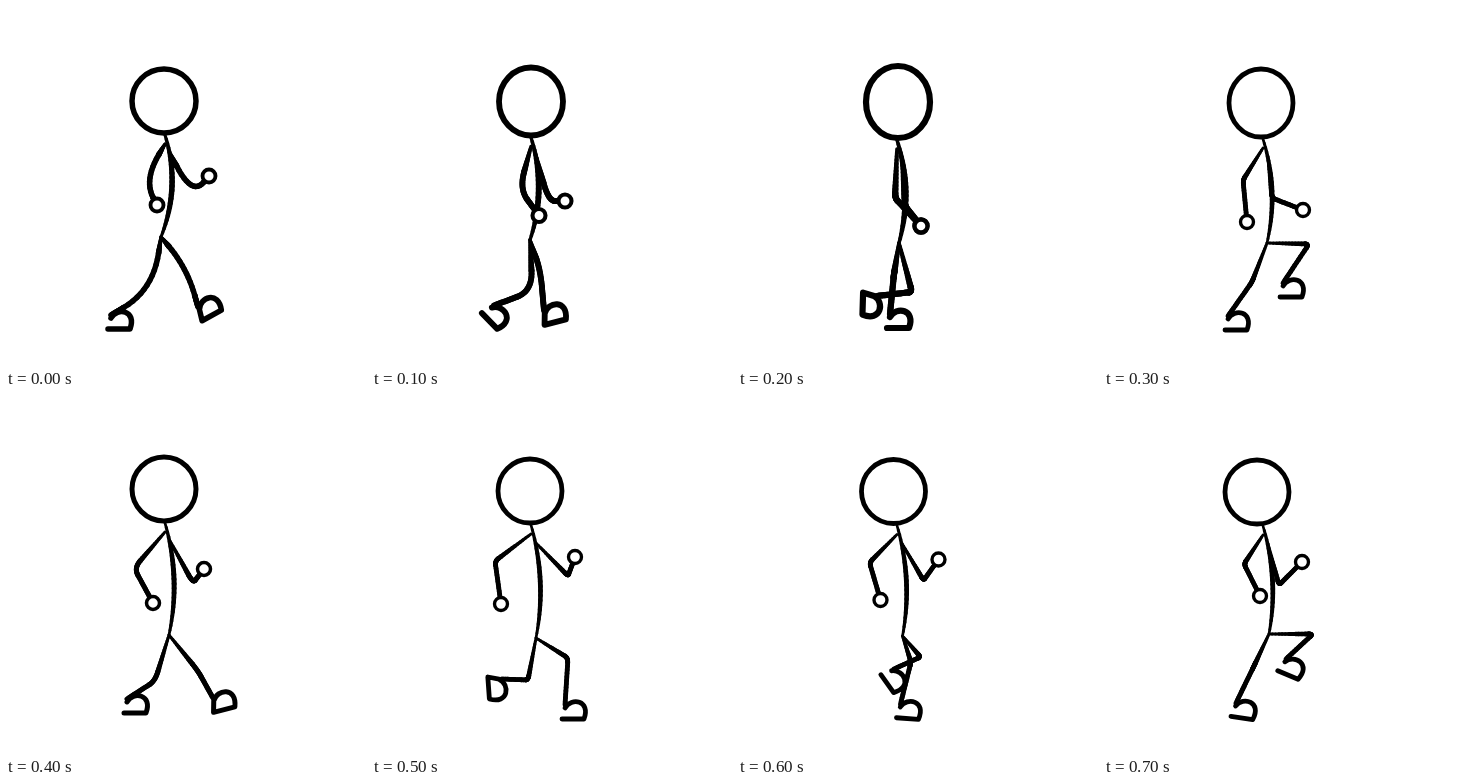
These frames come from a looping animation (360 by 360 pixels, 0.8 s). An HTML page with a canvas:

```html
<!DOCTYPE html>
<html lang="en">
<head>
<meta charset="utf-8">
<title>Walk cycle</title>
<style>
html, body { margin: 0; width: 100%; height: 100%; overflow: hidden; background: #fff; }
canvas { display: block; width: 360px; height: 360px; }
</style>
</head>
<body>
<canvas id="stage" width="360" height="360"></canvas>
<script>
const ctx = document.getElementById('stage').getContext('2d');
const STEP = 100;
const NECK_X = 159;

// Head: x, y, half height. Arms: elbow, hand. Legs: knee, ankle, foot tilt.
// Soft rounds the joints, ink is the pen width.
const contact = {
  ink: 5.5, soft: 0.7, head: [158, 95, 32], hip: [155, 231],
  rear: [[138, 174], [151, 199]], fore: [[186, 190], [203, 170]],
  legA: [[147, 284], [105, 309], 0], legB: [[181, 262], [192, 301], -0.5]
};
const passing = {
  ink: 6.2, soft: 0.1, head: [160, 96, 36], hip: [161, 237],
  rear: [[157, 192], [183, 220]], fore: [[167, 200], [183, 220]],
  legA: [[174, 286], [139, 290], 1.6], legB: [[156, 268], [152, 308], 0]
};
const lift = {
  ink: 4.8, soft: 0.1, head: [157, 97, 34], hip: [163, 237],
  rear: [[139, 174], [143, 216]], fore: [[168, 192], [199, 204]],
  legA: [[205, 238], [179, 277], 0], legB: [[148, 276], [124, 310], 0]
};
const reach = {
  ink: 5, soft: 0.2, head: [158, 95, 32], hip: [163, 241],
  rear: [[128, 174], [147, 209]], fore: [[187, 189], [198, 175]],
  legA: [[192, 277], [207, 304], -0.25], legB: [[149, 287], [121, 305], 0]
};
const push = {
  ink: 4.8, soft: 0.1, head: [158, 97, 32], hip: [164, 244],
  rear: [[123, 167], [129, 210]], fore: [[196, 182], [203, 163]],
  legA: [[196, 264], [193, 311], 0], legB: [[156, 286], [130, 285], 1.5]
};
const swing = {
  ink: 4.8, soft: 0.1, head: [153, 98, 32], hip: [165, 240],
  rear: [[140, 170], [156, 202]], fore: [[175, 191], [198, 168]],
  legA: [[150, 272], [132, 309], 0.15], legB: [[209, 240], [182, 265], 0.4]
};

const lerp = (a, b, t) => a + (b - a) * t;

// Blends numbers, points and whole poses alike.
function mix(a, b, t = 0.5) {
  if (typeof a === 'number') return lerp(a, b, t);
  if (Array.isArray(a)) return a.map((v, i) => mix(v, b[i], t));
  return Object.fromEntries(Object.keys(a).map(k => [k, mix(a[k], b[k], t)]));
}

const cycle = [
  contact, mix(contact, passing), passing, lift,
  reach, push, mix(push, swing), swing
];

function bend(a, c, b, steps = 12) {
  return Array.from({ length: steps + 1 }, (_, i) => {
    const t = i / steps;
    return mix(mix(a, c, t), mix(c, b, t), t);
  });
}

const straight = (a, b) => bend(a, mix(a, b), b);

// Draws a path whose width follows pressure(0..1).
function brush(pts, pressure) {
  for (let i = 1; i < pts.length; i++) {
    ctx.lineWidth = pressure(i / pts.length);
    ctx.beginPath();
    ctx.moveTo(...pts[i - 1]);
    ctx.lineTo(...pts[i]);
    ctx.stroke();
  }
}

function limb(root, joint, end, { ink, soft }) {
  const p = mix(joint, root, soft), q = mix(joint, end, soft);
  const pts = [...straight(root, p), ...bend(p, joint, q), ...straight(q, end)];
  brush(pts, t => ink * Math.min(1, 0.55 + 1.5 * t));
}

function ring(x, y, rx, ry, width) {
  ctx.lineWidth = width;
  ctx.beginPath();
  ctx.ellipse(x, y, rx, ry, 0, 0, 2 * Math.PI);
  ctx.fill();
  ctx.stroke();
}

function foot([x, y], tilt, width) {
  ctx.save();
  ctx.translate(x, y);
  ctx.rotate(tilt);
  ctx.lineWidth = width;
  ctx.beginPath();
  ctx.moveTo(0, 3);
  ctx.bezierCurveTo(6, -8, 26, -5, 19, 14);
  ctx.lineTo(-3, 14);
  if (tilt < 0 || tilt > 1) ctx.closePath();
  ctx.stroke();
  ctx.restore();
}

function draw(pose) {
  const { ink, hip, head: [hx, hy, hr] } = pose;
  const neck = hy + hr + 2;

  ctx.fillStyle = '#fff';
  ctx.fillRect(0, 0, 360, 360);
  ctx.strokeStyle = '#000';
  ctx.lineCap = ctx.lineJoin = 'round';

  ring(hx, hy, 32, hr, ink);
  brush(bend([NECK_X, neck], [NECK_X + 16, (neck + hip[1]) / 2], hip, 24),
    t => ink * (0.5 + 0.5 * Math.sin(Math.PI * t)));

  for (const [knee, ankle, tilt] of [pose.legA, pose.legB]) {
    limb(hip, knee, ankle, pose);
    foot(ankle, tilt, ink);
  }

  limb([NECK_X, neck + 9], ...pose.rear, pose);
  limb([NECK_X + 5, neck + 18], ...pose.fore, pose);
  for (const [, [x, y]] of [pose.rear, pose.fore]) ring(x, y, 6.5, 6.5, ink * 0.7);
}

function tick() {
  draw(cycle[Math.floor(performance.now() / STEP) % cycle.length]);
  requestAnimationFrame(tick);
}
tick();
</script>
</body>
</html>
```
